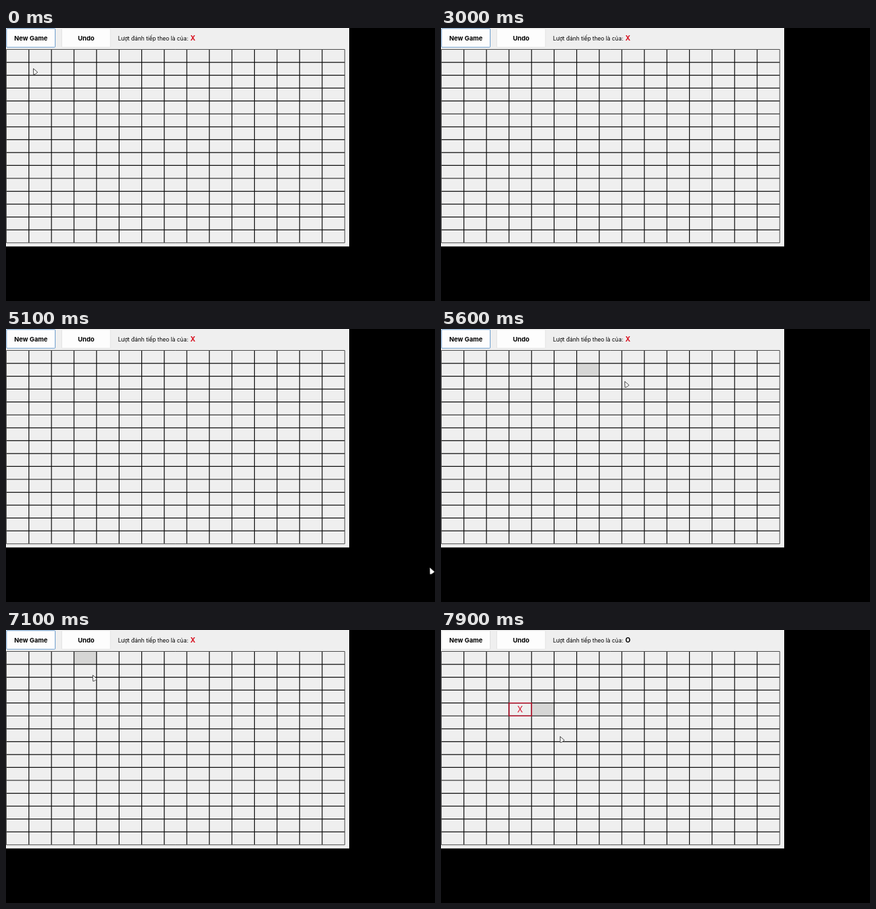
An HTML page with a canvas for the animation above (8 s loop, 650 by 414 pixels).

```html
<!DOCTYPE html>
<html lang="vi">
<head>
<meta charset="utf-8">
<title>Caro</title>
<style>
  html, body { margin: 0; width: 100%; height: 100%; overflow: hidden; background: #000; }
  canvas { display: block; }
</style>
</head>
<body>
<canvas id="stage" width="650" height="414"></canvas>
<script>
const ctx = document.getElementById('stage').getContext('2d');
const LOOP = 8000, STEP = 100, CLICK = 7600;
const COUNT = 15, LEFT = 0.5, TOP = 32.5, CELL_W = 34.18, CELL_H = 19.55;
const RIGHT = LEFT + COUNT * CELL_W, BOTTOM = TOP + COUNT * CELL_H;
const MARK = [3, 4];

// Pointer strokes: a curve walked in equal steps, then a rest until the end.
// "lead" is where the pointer was just before the stroke.
const strokes = [
  { start: 0, end: 400, steps: 1, from: [41, 61], to: [41, 61] },
  { start: 400, end: 600, steps: 2, from: [24, 28], to: [4, 16] },
  { start: 3800, end: 4500, steps: 7, from: [573, 160], to: [181, 33] },
  { start: 5100, end: 5800, steps: 6, from: [642, 362], bend: [67, -35], to: [278, 79] },
  { start: 5800, end: 6100, steps: 3, from: [205, 55], to: [19, 12], lead: [225, 60] },
  { start: 7100, end: CLICK, steps: 5, from: [131, 68], to: [117, 118], lead: [120, 42] },
  { start: CLICK, end: LOOP, steps: 4, from: [117, 118], bend: [145, 98], to: [180, 161], lead: [117, 118] }
];

function pointAt({ from, to, bend, steps }, step) {
  const u = steps > 1 ? step / (steps - 1) : 0, v = 1 - u;
  return from.map((a, axis) => {
    const b = to[axis], c = bend ? bend[axis] : (a + b) / 2;
    return v * v * a + 2 * u * v * c + u * u * b;
  });
}

function text(str, x, y, font, color = '#000', align = 'left') {
  ctx.font = `${font} Inter, sans-serif`;
  ctx.fillStyle = color;
  ctx.textAlign = align;
  ctx.fillText(str, x, y);
}

function button(label, x, border) {
  ctx.fillStyle = '#fdfdfd';
  ctx.strokeStyle = border;
  ctx.lineWidth = 1;
  ctx.beginPath();
  ctx.roundRect(x, 0.8, 73.7, 28.4, 1);
  ctx.fill();
  ctx.stroke();
  text(label, x + 36.9, 18.8, 'bold 9.6px', '#000', 'center');
}

function cellRect([col, row]) {
  return [LEFT + col * CELL_W, TOP + row * CELL_H, CELL_W, CELL_H];
}

function drawHover([x, y]) {
  const col = Math.floor((x - LEFT) / CELL_W), row = Math.floor((y - TOP) / CELL_H);
  if (col < 0 || row < 0 || col >= COUNT || row >= COUNT) return;
  ctx.fillStyle = '#d6d6d5';
  ctx.fillRect(...cellRect([col, row]));
}

function drawGrid() {
  ctx.strokeStyle = '#0a0a0a';
  ctx.lineWidth = 1.2;
  ctx.beginPath();
  for (let i = 1; i < COUNT; i++) {
    const x = LEFT + i * CELL_W, y = TOP + i * CELL_H;
    ctx.moveTo(x, TOP);
    ctx.lineTo(x, BOTTOM);
    ctx.moveTo(LEFT, y);
    ctx.lineTo(RIGHT, y);
  }
  ctx.stroke();
  ctx.strokeStyle = '#484848';
  ctx.lineWidth = 1;
  ctx.strokeRect(LEFT, TOP, RIGHT - LEFT, BOTTOM - TOP);
}

function drawMark() {
  const [x, y, w, h] = cellRect(MARK);
  ctx.strokeStyle = '#b5122b';
  ctx.lineWidth = 1.6;
  ctx.strokeRect(x, y, w, h);
  text('X', x + w / 2 - 0.4, y + 14, '12.5px', '#d80f2a', 'center');
}

function drawPointer([x, y]) {
  ctx.beginPath();
  ctx.moveTo(x + 0.5, y + 0.5);
  ctx.lineTo(x + 0.8, y + 9.6);
  ctx.lineTo(x + 3.2, y + 9);
  ctx.lineTo(x + 6.9, y + 6.2);
  ctx.closePath();
  ctx.lineJoin = 'round';
  ctx.lineWidth = 1;
  ctx.fillStyle = '#fff';
  ctx.strokeStyle = x > 520 ? '#ccc' : '#444';
  ctx.fill();
  ctx.stroke();
}

function draw(time) {
  const t = time % LOOP, played = t >= CLICK;
  const stroke = strokes.find(({ start, end }) => t >= start && t < end);

  ctx.fillStyle = '#000';
  ctx.fillRect(0, 0, 650, 414);
  ctx.fillStyle = '#efefef';
  ctx.fillRect(0, 0, 520, 331.3);

  button('New Game', 0.8, played ? '#dedede' : '#6a9ccc');
  button('Undo', 84.5, '#e4e4e4');
  text('Lượt đánh tiếp theo là của:', 169.7, 18.9, '8.5px');
  if (played) text('O', 279.2, 19.3, 'bold 10.2px');
  else text('X', 279.2, 19.4, 'bold 10.5px', '#d80f1e');

  if (!stroke) return drawGrid();

  // Hover shading lags one step behind the pointer.
  const step = Math.min(Math.floor((t - stroke.start) / STEP), stroke.steps - 1);
  const trail = step > 0 ? pointAt(stroke, step - 1) : stroke.lead;
  if (trail) drawHover(trail);
  drawGrid();
  if (played) drawMark();
  drawPointer(pointAt(stroke, step));
}

function tick() {
  draw(performance.now());
  requestAnimationFrame(tick);
}
tick();
</script>
</body>
</html>
```
